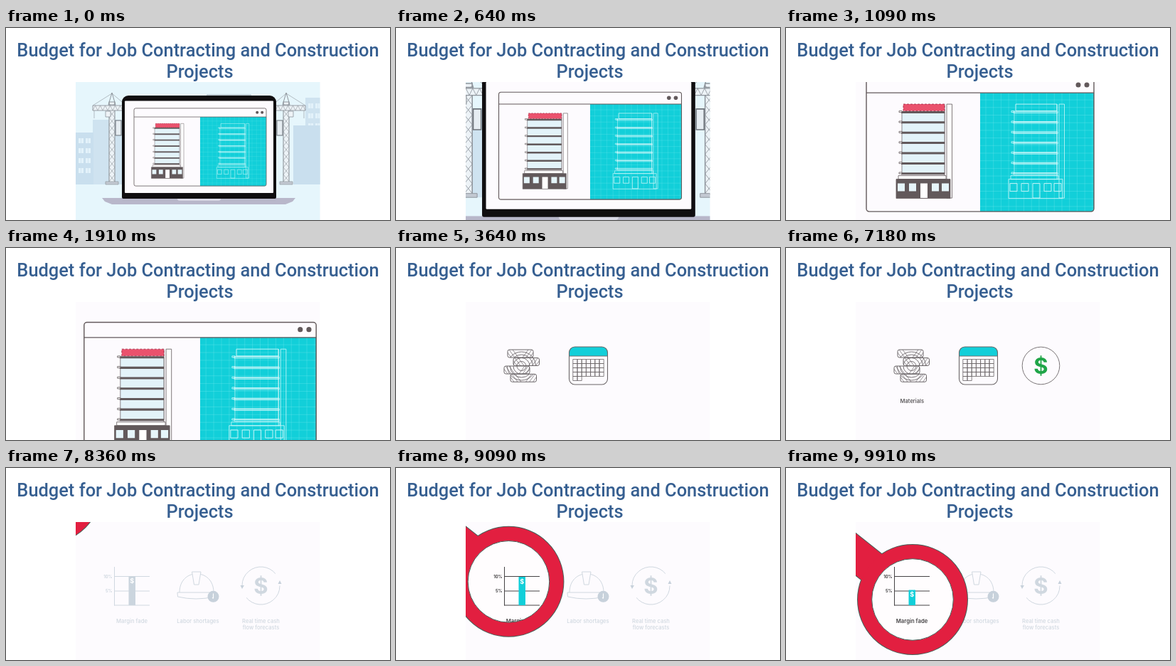
These frames come from a looping animation (540x270 px, 10000 ms). An HTML page with a canvas:

```html
<!DOCTYPE html>
<html lang="en">
<head>
<meta charset="utf-8">
<title>Budget for Job Contracting and Construction Projects</title>
<style>
  html, body { margin: 0; width: 100%; height: 100%; overflow: hidden; background: #fff; }
  canvas { display: block; width: 540px; height: 270px; }
</style>
</head>
<body>
<canvas id="stage" width="540" height="270"></canvas>
<script>
const g = document.getElementById('stage').getContext('2d');
const LOOP = 10000, STEP = 1000 / 11;
const PAPER = '#fdfbfe', TEAL = '#12cfd9', INK = '#62595b', RED = '#e21f40';
const LINE = '#6b6668', PALE = '#d0d8e0', GREEN = '#1fa548';
const TAU = Math.PI * 2;

const clamp = v => Math.max(0, Math.min(1, v));
const span = (t, a, b) => clamp((t - a) / (b - a));
const mix = (a, b, p) => a + (b - a) * p;
const easeSine = p => (1 - Math.cos(Math.PI * p)) / 2;
const easeOut = p => 1 - (1 - p) ** 3;

function group(draw) { g.save(); draw(); g.restore(); }

function paint(fill, stroke, width = 1) {
  if (fill) { g.fillStyle = fill; g.fill(); }
  if (stroke) { g.strokeStyle = stroke; g.lineWidth = width; g.stroke(); }
}
function box(x, y, w, h, fill, stroke, width, r = 0) {
  g.beginPath();
  g.roundRect(x, y, w, h, r);
  paint(fill, stroke, width);
}
function disc(x, y, r, fill, stroke, width) {
  g.beginPath();
  g.arc(x, y, r, 0, TAU);
  paint(fill, stroke, width);
}
function poly(points, fill, stroke, width, close = true) {
  g.beginPath();
  points.forEach(([x, y]) => g.lineTo(x, y));
  if (close) g.closePath();
  paint(fill, stroke, width);
}
const line = (x1, y1, x2, y2, color, width = 1) =>
  poly([[x1, y1], [x2, y2]], null, color, width, false);

function label(text, x, y, color, font, align = 'center') {
  g.font = font + ' Inter, "Open Sans", sans-serif';
  g.textAlign = align;
  g.fillStyle = color;
  g.fillText(text, x, y);
}

// ---- Laptop scene ----

function crane(x, dir) {
  const c = '#8f959c', tip = x + dir * 27, tail = x - dir * 20;
  box(x - 4, 104, 8, 113, '#edf3f7', c, 1.1);
  for (let y = 106; y < 216; y += 10) {
    line(x - 4, y, x + 4, y + 10, c, .6);
    line(x + 4, y, x - 4, y + 10, c, .6);
  }
  box(x - 9, 216, 18, 4, '#c3c9d2', c, .7);
  poly([[x - 5, 108], [x, 91], [x + 5, 108]], null, c, 1);
  box(Math.min(tip, tail), 109, 47, 7, '#edf3f7', c, .9);
  for (let a = 0; a < 42; a += 7)
    poly([[tip - dir * a, 116], [tip - dir * (a + 3.5), 109], [tip - dir * (a + 7), 116]],
      null, c, .6, false);
  line(x, 92, tip, 109, c, .6);
  line(x, 92, tail, 109, c, .6);
  box(x + dir * 6 - 3, 117, 7, 8, '#eef3f7', c, .8);
  line(tip - dir * 2, 116, tip - dir * 2, 127, c, .6);
  box(x - dir * 9 - 4, 130, 8, 21, '#e6edf2', '#6d737a', 1.1);
}

function tower(x, y, w, color, windowsEnd = 0) {
  box(x, y, w, 220 - y, color);
  for (let wy = y + 8; wy < windowsEnd; wy += 14)
    for (let wx = x + 4; wx + 7 <= x + w; wx += 10) {
      box(wx, wy, 7, 7, '#e3f2fa');
      line(wx + 3.5, wy, wx + 3.5, wy + 7, color, .6);
    }
}

function laptop() {
  box(-100, -100, 800, 600, '#e6f6fc');
  tower(122, 129, 43, '#cfe3f0');
  tower(98, 147, 25, '#c9dfee', 205);
  tower(421, 98, 24, '#cfe3f0', 135);
  tower(404, 137, 40, '#c9dfee');
  crane(149, -1);
  crane(394, 1);
  line(282, 94, 345, 94, '#8f959c', .8);
  poly([[135, 239], [407, 239], [403, 244], [393, 248], [149, 248], [139, 244]], '#b8b7ca');
  box(241, 239, 61, 4, '#d9d8e6', null, 0, [0, 0, 3, 3]);
  box(163, 95, 217, 145, '#100e10', null, 0, [9, 9, 2, 2]);
  box(167, 102.5, 209, 129.5, PAPER, null, 0, 1);
}

// ---- Drawing window; origin at the top centre ----

function building(dx, blueprint) {
  const edge = blueprint ? '#d2f8fa' : INK;
  const fill = color => blueprint ? null : color;
  group(() => {
    g.translate(dx, 0);
    box(-47, 37, 7.5, 132, fill('#fff'), edge, .8);
    line(-50, 37, -50, 143, edge, .8);
    group(() => {
      if (!blueprint) g.setLineDash([3, 2]);
      box(-108, 37, 58, 9.5, fill('#ea526d'), blueprint ? edge : '#a8324c', .9);
    });
    for (let i = 0; i < 7; i++) {
      const y = 48 + i * 14.4;
      if (i < 6) box(-110, y, 60, 14.4, fill('#e3f3f9'), edge, .7);
      if (blueprint) box(-111, y - 1, 62, 2.6, null, edge, .8);
      else box(-111, y - 1.2, 61, 3, INK);
      box(-114, y - 1.5, 4, 2, fill('#fff'), edge, .8);
    }
    box(-115, 137.5, 67, 5, fill('#fff'), edge, .8);
    box(-118, 142.5, 76, 27, fill(INK), edge, .8);
    for (const x of [-116, -100, -68, -54])
      box(x, 148.5, 10, 11, fill('#e6f5fa'), blueprint && edge, .9);
    box(-84, 148.5, 10, 20.5, fill('#fff'), blueprint && edge, .9);
  });
}

function drawingWindow() {
  box(-160, 0, 320, 188, PAPER, null, 0, 4);
  box(0, 21, 160, 167, TEAL, null, 0, [0, 0, 4, 0]);
  group(() => {
    g.globalAlpha = .32;
    for (let x = 8; x < 160; x += 10.7) line(x, 21, x, 188, '#8df0f2', .8);
    for (let y = 31; y < 188; y += 10.7) line(0, y, 160, y, '#8df0f2', .8);
  });
  building(0, false);
  building(158, true);
  line(-160, 21, 160, 21, INK, 1.3);
  box(-160, 0, 320, 188, null, INK, 1.4, 4);
  disc(138, 10, 3.5, INK);
  disc(150, 10, 3.5, INK);
}

function zoomScene(t) {
  const p = easeSine(span(t, 0, 1264));
  const scale = mix(.58125, 1.02, p);
  const s = Math.max(0, t - 1090) / 1000;
  const drop = 33 * s + 14 * s * s + 195 * Math.max(0, s - 1.09) ** 2;
  const cy = 167.5 - 3.6 * p + drop;
  if (t < 1080) group(() => {
    g.translate(273, cy);
    g.scale(scale / .58125, scale / .58125);
    g.translate(-273, -167.5);
    laptop();
  });
  group(() => {
    g.translate(273, cy - 94 * scale);
    g.scale(scale, scale);
    drawingWindow();
  });
}

// ---- Cost icons ----

function wipe(x, w, p, draw) {
  if (p <= 0) return;
  group(() => {
    g.beginPath();
    g.rect(x, 130, w * p, 70);
    g.clip();
    draw();
  });
}

function planks() {
  const rows = [[157, 143, 36], [165, 154.5, 36.5], [152, 166, 36], [161, 177.3, 36.5]];
  for (const [x, y, w] of rows) {
    group(() => {
      g.beginPath();
      g.roundRect(x, y, w, 11, 2.5);
      g.clip();
      for (const r of [6.5, 11.5, 16, 20]) disc(176.5, 166, r, null, LINE, .9);
      for (const d of [0, 5, 10]) {
        line(x + d - 3, y, x + d + 5, y + 11, LINE, .7);
        line(x + w - d + 3, y, x + w - d - 5, y + 11, LINE, .7);
      }
    });
    box(x, y, w, 11, null, LINE, 1, 2.5);
  }
}

function calendar() {
  box(243.5, 139, 54, 53, PAPER, null, 0, 8);
  box(243.5, 139, 54, 13, TEAL, null, 0, [8, 8, 0, 0]);
  line(243.5, 152, 297.5, 152, LINE, .9);
  box(243.5, 139, 54, 53, null, LINE, 1.1, 8);
  for (let i = 0; i < 30; i++)
    box(248.8 + i % 7 * 6.2, 156.5 + Math.floor(i / 7) * 6, 6.2, 6, null, LINE, .8);
}

function bigDollar(color) {
  label('$', 358.5, 177, color, '700 31px');
}

function costIcons(t) {
  wipe(150, 54, span(t, 2750, 3200), planks);
  wipe(242, 57, span(t, 3130, 3630), calendar);
  wipe(331, 56, span(t, 3960, 4600), () => {
    disc(358.5, 165.5, 26.3, null, LINE, .9);
    bigDollar(GREEN);
  });
  const word = 'Materials', font = '500 7.6px';
  g.font = font + ' Inter, "Open Sans", sans-serif';
  const left = 177.3 - g.measureText(word).width / 2;
  [...word].forEach((letter, i) => {
    const start = 4850 + i * 90;
    const x = left + g.measureText(word.slice(0, i)).width;
    group(() => {
      g.globalAlpha *= span(t, start, start + 180);
      label(letter, x, 217.5, '#4b484a', font, 'left');
    });
  });
}

// ---- Problem icons ----

function chart(ink, bar, level, weight) {
  const top = mix(193, 152.5, level);
  line(152.5, 139, 152.5, 193.5, ink, 1);
  for (const y of [152.5, 173, 193]) line(152, y, 202, y, ink, 1);
  box(172.5, top, 9.5, 193 - top, bar);
  label('$', 177.3, top + 9.5, '#fff', '700 9px');
  label('10%', 149.5, 155, ink, '700 5.8px', 'right');
  label('5%', 149.5, 175, ink, '700 5.8px', 'right');
  label('Margin fade', 177, 218, ink, weight + ' 7.7px');
}

function helmet() {
  g.beginPath();
  g.moveTo(244, 175);
  g.bezierCurveTo(244, 140, 292, 140, 292, 175);
  paint(null, PALE, 1);
  poly([[261.5, 146], [274, 146], [271, 164], [264.5, 164]], PAPER, PALE, 1);
  g.beginPath();
  g.moveTo(241, 175);
  g.lineTo(293, 175);
  g.lineTo(293, 181);
  g.quadraticCurveTo(267, 187, 241.5, 181);
  g.closePath();
  paint(PAPER, PALE, 1);
  disc(291.5, 180.8, 8, '#c7d1db');
  line(291.5, 176.5, 291.5, 183, '#fff', 1.2);
  line(290, 182, 291.5, 184, '#fff', 1);
}

function cashCycle() {
  const arc = (from, to) => {
    g.beginPath();
    g.arc(358.5, 165.5, 26.5, from * Math.PI, to * Math.PI, true);
    paint(null, PALE, 1);
  };
  arc(-.22, -1);
  arc(.78, 0);
  poly([[329.5, 165], [335, 165], [332, 170]], '#c7d1db');
  poly([[382.5, 163], [387.5, 163], [385, 158]], '#c7d1db');
  bigDollar(PALE);
}

function problemIcons() {
  const font = '500 7.6px';
  chart(PALE, '#cbd5de', 1, 500);
  helmet();
  cashCycle();
  label('Labor shortages', 270, 218, PALE, font);
  label('Real time cash', 358.5, 218, PALE, font);
  label('flow forecasts', 358.5, 227, PALE, font);
}

function magnifier(t) {
  const p = easeOut(span(t, 8360, 9960));
  const x = mix(56, 178, p), y = mix(28, 185, p);
  const body = (fill, stroke) => {
    group(() => {
      g.translate(x, y);
      g.rotate(Math.atan2(-.62, -.78));
      box(60, -23, 220, 46, fill, stroke, 2);
    });
    disc(x, y, 77, fill, stroke, 2);
  };
  body(null, '#47605a');
  body(RED);
  disc(x, y, 57.3, '#fffdfe', '#47605a', 1);
  group(() => {
    g.beginPath();
    g.arc(x, y, 57, 0, TAU);
    g.clip();
    const level = mix(1, .53, easeSine(span(t, 9000, 9850)));
    chart('#454345', TEAL, level, 600);
  });
}

// ---- Timeline ----

function title() {
  g.font = '500 25.4px Roboto, "Open Sans", sans-serif';
  g.textAlign = 'center';
  g.fillStyle = '#365f91';
  g.fillText('Budget for Job Contracting and Construction', 270, 40);
  g.fillText('Projects', 272.5, 70);
}

function render(t) {
  g.clearRect(0, 0, 540, 270);
  title();
  group(() => {
    g.beginPath();
    g.rect(98, 76, 343.5, 194);
    g.clip();
    box(98, 76, 344, 194, PAPER);
    if (t < 3000) zoomScene(t);
    if (t > 2700 && t < 7700) group(() => {
      g.globalAlpha = 1 - span(t, 7200, 7650);
      costIcons(t);
    });
    if (t > 7500) group(() => {
      g.globalAlpha = span(t, 7500, 8080);
      problemIcons();
    });
    if (t >= 8360) magnifier(t);
  });
}

function tick(now) {
  const frame = Math.floor((now % LOOP + 9.9) / STEP);
  render(Math.min(frame, 109) * STEP);
  requestAnimationFrame(tick);
}
render(0);
requestAnimationFrame(tick);
</script>
</body>
</html>
```
